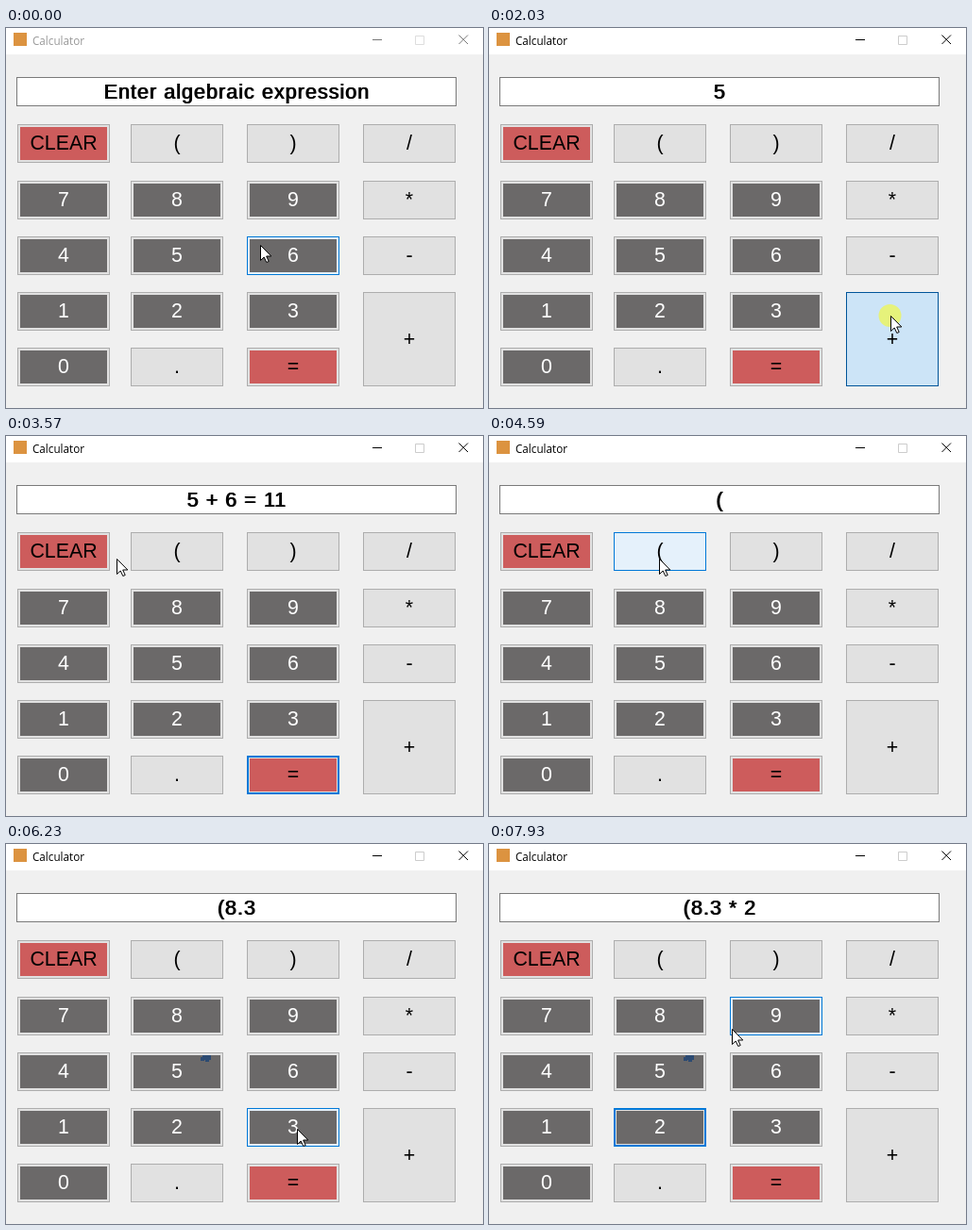
These frames come from a looping animation (505 px wide and 403 px high, 8 s). An HTML page:

```html
<!DOCTYPE html>
<html lang="en">
<head>
<meta charset="utf-8">
<title>Calculator</title>
<style>
  html, body { margin: 0; width: 100%; height: 100%; overflow: hidden; background: #f0f0f0; }
  body { position: relative; font: 21.33px "Liberation Sans", Arial, sans-serif; cursor: default; }
  #bar { position: absolute; left: 0; top: 0; width: 505px; height: 28px; background: #fff; }
  #icon { position: absolute; left: 8px; top: 5px; width: 14px; height: 14px; background: #dc9340; }
  #name { position: absolute; left: 28px; top: 5px; font: 11.7px/16px "Open Sans", "Noto Sans", sans-serif; }
  #bar.idle #name { color: #999; }
  svg { position: absolute; left: 0; top: 0; overflow: visible; }
  #controls { fill: none; stroke: #000; }
  #controls .max { stroke: #ccc; }
  .idle #controls { stroke: #777; }
  .idle #controls .max { stroke: #ddd; }

  #display {
    position: absolute; left: 11px; top: 52px; width: 466px; height: 31px;
    background: #fff; box-shadow: inset 0 0 0 1px #7a7a7a;
    font-size: 21.6px; line-height: 31px; letter-spacing: 1px; text-shadow: 1px 0 #000;
    text-align: center; white-space: pre;
  }
  #display.focus { box-shadow: inset 0 0 0 1px #0078d7; }
  #caret { position: absolute; left: 244px; top: 55px; width: 1px; height: 25px; background: #000; }

  .key {
    --face: #e1e1e1; --edge: #adadad; --line: 1px;
    position: absolute; width: 98px; text-align: center;
    background: var(--fill, var(--face));
    box-shadow: inset 0 0 0 var(--line) var(--edge), inset 0 0 0 3px var(--face);
  }
  .digit { --fill: #6b6969; color: #fff; }
  .red { --fill: #cd5c5c; }
  .key.focus { --edge: #0078d7; --line: 2px; }
  .key.hover { --face: #e5f1fb; --edge: #0078d7; --line: 1px; }
  .key.press { --face: #cce4f7; --edge: #005499; --line: 1px; }
</style>
</head>
<body>
<div id="bar">
  <div id="icon"></div>
  <div id="name">Calculator</div>
  <svg id="controls" width="505" height="28">
    <path d="M388 12.5h10M479.5 7.5l9.5 9.5M489 7.5l-9.5 9.5"/>
    <path class="max" d="M433.5 8.5h9v9h-9z"/>
  </svg>
</div>
<div id="display"></div>
<div id="caret"></div>
<svg id="overlay" width="505" height="403">
  <path id="smudge" fill="#2c4a72" d="M208 224h9v5h-2v2h-4v-2h-1v1h-4v-4h2z"/>
  <g id="pointer">
    <circle id="glow" cx="-.5" r="12" fill="#ff0" fill-opacity=".5"/>
    <path id="arrow" fill="#fff" stroke="#000" d="M.5.5V16.5L4.2 13L6.8 18.5L9.2 17.5L6.7 12H11.8Z"/>
    <path id="beam" fill="none" stroke="#000" d="M-3 -8.5h2.5v17H-3M2 -8.5h-2.5M2 8.5h-2.5"/>
  </g>
</svg>
<script>
const LOOP = 8000, STEPS = 103, STEP = LOOP / STEPS;
const $ = id => document.getElementById(id);

const columns = [12, 132, 255, 378];
const rows = [102, 162, 221, 280, 339];
const layout = [
  ['CLEAR', '(', ')', '/'],
  ['7', '8', '9', '*'],
  ['4', '5', '6', '-'],
  ['1', '2', '3', '+'],
  ['0', '.', '=']
];

// Pointer stops: time, x, y
const path = [
  [0, 269, 230], [70, 269, 230], [540, 226, 68], [920, 226, 68],
  [1170, 176, 284], [1310, 174, 249], [1480, 173, 246], [1780, 173, 246],
  [2010, 425, 305], [2480, 425, 305], [2790, 306, 246], [2890, 306, 246],
  [3110, 303, 366], [3290, 303, 366], [3560, 118, 130], [3740, 72, 126],
  [4110, 72, 126], [4350, 180, 127], [4560, 180, 127], [4850, 184, 289],
  [4990, 184, 284], [5140, 186, 186], [5270, 186, 186], [5580, 191, 353],
  [5750, 191, 356], [5840, 262, 344], [6000, 308, 302], [6640, 308, 302],
  [7130, 436, 182], [7300, 436, 182], [7470, 190, 303], [7650, 190, 303],
  [7910, 257, 196], [8000, 257, 196]
];

// Clicks: press time, target, text shown on release
const HOLD = 130;
const clicks = [
  [640, 'display', ''],
  [1630, '5', '5'],
  [2010, '+', '5 +'],
  [2790, '6', '5 + 6'],
  [3110, '=', '5 + 6 = 11'],
  [3800, 'CLEAR', ''],
  [4400, '(', '('],
  [5140, '8', '(8'],
  [5660, '.', '(8.'],
  [6050, '3', '(8.3'],
  [7200, '*', '(8.3 *'],
  [7530, '2', '(8.3 * 2']
];

const keys = layout.flatMap((line, r) => line.map((label, c) => {
  const el = document.createElement('div');
  const key = { label, el, x: columns[c], y: rows[r], h: label === '+' ? 100 : 41 };
  el.className = 'key' + (/\d/.test(label) ? ' digit' : /CLEAR|=/.test(label) ? ' red' : '');
  el.textContent = label;
  el.style.cssText = `left:${key.x}px;top:${key.y}px;height:${key.h}px;line-height:${key.h}px`;
  document.body.insertBefore(el, $('overlay'));
  return key;
}));

const inside = (x, y, left, top, w, h) => x >= left && x < left + w && y >= top && y < top + h;
const show = (id, on) => $(id).style.display = on ? '' : 'none';

function pointerAt(t) {
  const i = Math.max(1, path.findIndex(p => p[0] > t));
  const [t0, x0, y0] = path[i - 1], [t1, x1, y1] = path[i];
  const u = (t - t0) / (t1 - t0), e = u * u * (3 - 2 * u);
  return [Math.round(x0 + (x1 - x0) * e), Math.round(y0 + (y1 - y0) * e)];
}

function render(time) {
  const t = Math.min(STEPS - 1, Math.floor(time / STEP + 0.15)) * STEP;
  const [x, y] = pointerAt(t);
  const current = clicks.filter(c => c[0] <= t).pop();
  const released = clicks.filter(c => c[0] + HOLD <= t).pop();
  const focus = current && current[1];
  const pressing = current !== released;

  $('bar').classList.toggle('idle', !current);
  $('display').textContent = released ? released[2] : 'Enter algebraic expression';
  $('display').classList.toggle('focus', focus === 'display');
  show('caret', focus === 'display' && released && t < 1160);

  for (const { label, el, x: left, y: top, h } of keys) {
    el.classList.toggle('focus', focus === label);
    el.classList.toggle('hover', inside(x, y, left, top, 98, h));
    el.classList.toggle('press', pressing && focus === label);
  }

  const overDisplay = inside(x, y, 11, 52, 466, 31);
  show('arrow', !overDisplay);
  show('beam', overDisplay);
  show('glow', pressing);
  show('smudge', t > 5350);
  $('pointer').setAttribute('transform', `translate(${x} ${y})`);
}

const start = performance.now();
function tick() {
  render((performance.now() - start) % LOOP);
  requestAnimationFrame(tick);
}
tick();
</script>
</body>
</html>
```
